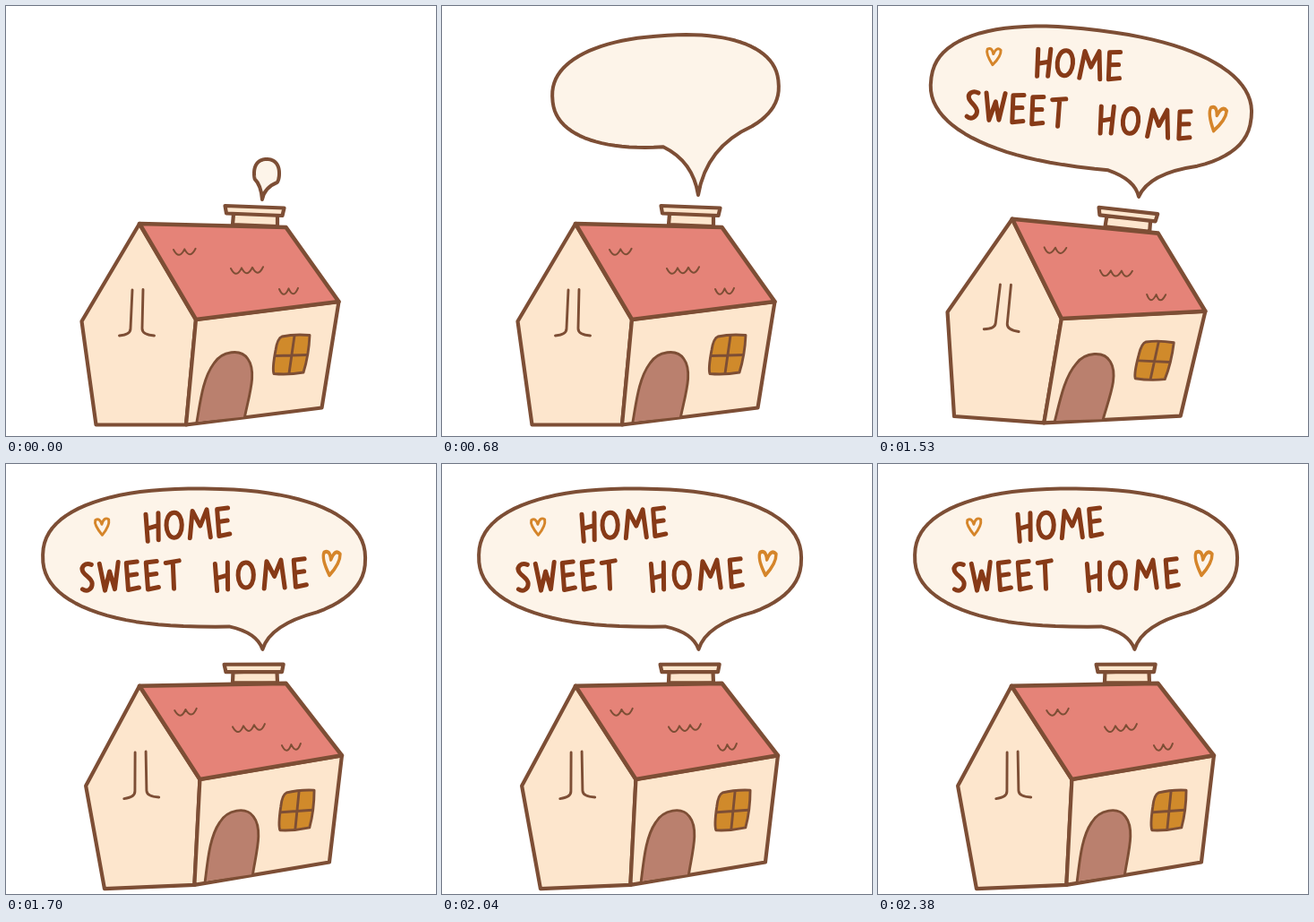
An HTML page for the animation above (2550 ms loop, 480 px wide and 480 px high).

```html
<!DOCTYPE html>
<html lang="en">
<head>
<meta charset="utf-8">
<title>Home sweet home</title>
<style>
  html, body { margin: 0; width: 100%; height: 100%; overflow: hidden; background: #fff; }
  svg { display: block; width: 100vw; height: 100vh; }
  path { fill: none; stroke: #7d4e35; stroke-width: 2.9; stroke-linecap: round; stroke-linejoin: round; }
  .wall path { fill: #fde6cd; stroke-width: 4.2; }
  .wall .roof { fill: #e58378; stroke-width: 4.6; }
  .door { fill: #ba806e; }
  .pane { fill: #d08a2b; }
  #tiles path { stroke-width: 2; }
  #bubble { fill: #fdf4e9; stroke-width: 4; }
  #letters path { stroke: #873a17; stroke-width: 5; }
  #heart { stroke: #d5852a; }
</style>
</head>
<body>
<svg viewBox="0 0 480 480" role="img" aria-label="Home sweet home">
  <defs>
    <path id="heart" d="M0 10Q-9 -2 -7 -7Q-2 -10 0 -2Q3 -11 8 -7Q9 0 0 10"/>
  </defs>
  <g id="scene">
    <g class="wall">
      <path d="M254 232H303V246L253 244Z"/>
      <path d="M244.500 223L310.500 225.500L308.500 234L246 231.500Z"/>
      <path d="M149 243L84.500 352L100.500 467.500H201L212 350Z"/>
      <path d="M212 350L201 467.500L352.500 448.500L371.500 330Z"/>
      <path class="roof" d="M149 243L312.500 247L371.500 330L212 350Z"/>
    </g>
    <g id="tiles"></g>
    <path d="M141 317L139 360Q139 367 126.500 368M153 316.500L152 360Q152 367 165.500 368"/>
    <path class="door" d="M213 464C217 441 220 415 232 399C241 385 262 382 270 394C280 408 272 432 266.500 458.500"/>
    <path class="pane" d="M308 369Q322 366 339 367.500Q338 390 332 409Q315 412 299 410.500Q297 405 301 384Q303 371 308 369Z"/>
    <path d="M322 368L316 410M301 390.500L336 389.500"/>
    <path id="bubble"/>
    <g id="text">
      <g id="letters"></g>
      <use href="#heart" transform="translate(114.500 63)"/>
      <use href="#heart" transform="translate(368 114) rotate(8) scale(1.200 1.450)"/>
    </g>
  </g>
</svg>
<script>
const STEP = 170, COUNT = 15, GROWN = 4, WORDS = 6, FULL = 8;
const $ = id => document.getElementById(id);

// A row of scallops on the roof.
function tile(x, y, count, w) {
  const arc = `q${w / 2} 12 ${w} -.6`;
  $("tiles").innerHTML += `<path d="M${x} ${y}${arc.repeat(count)}"/>`;
}
tile(187, 272, 2, 12.3);
tile(251, 293, 3, 12);
tile(305, 316, 2, 10.5);

// Pen strokes and width of each letter.
const glyphs = {
  H: ["M0 1L1 31M14 0L13 30M1 17L13 14", 14],
  O: ["M9 1C-3 1 -3 29 8 29C20 29 20 1 9 1", 17],
  M: ["M0 31L4 1L12 18L20 0L23 31", 23],
  E: ["M12 0L0 1L1 31L13 29M1 15L11 14", 13],
  S: ["M11 2C4 -1 -1 4 1 9C3 14 11 17 11 23C11 29 5 33 0 29", 11],
  W: ["M0 1L5 31L11 10L16 30L21 0", 21],
  T: ["M0 2L15 0M8 1V31", 15]
};

function word(text, x, y, gap, slope) {
  for (const c of text) {
    const [d, width] = glyphs[c];
    $("letters").innerHTML += `<path d="${d}" transform="translate(${x} ${y})"/>`;
    x += width + gap;
    y += slope;
  }
}
word("HOME", 164, 51, 8.6, -.8);
word("SWEET", 90, 103.500, 9, .4);
word("HOME", 239, 109.500, 11.300, -.2);

// A bubble is a soft oval whose outline opens between two angles into a tail.
const drop = { x: 291, y: 187, rx: 14, ry: 16, tilt: 0, tipX: 286, tipY: 216, from: 160, to: 35 };
const balloon = { x: 249.5, y: 95, rx: 126.5, ry: 62, tilt: -4, tipX: 286, tipY: 211, from: 92, to: 45 };
const speech = { x: 227, y: 103, rx: 180, ry: 77, tilt: 3, tipX: 288, tipY: 208, from: 83, to: 48 };

const rad = deg => deg * Math.PI / 180;
const soften = v => Math.sign(v) * Math.abs(v) ** .87;

function outline(b) {
  const cos = Math.cos(rad(b.tilt)), sin = Math.sin(rad(b.tilt));
  const sweep = 360 + b.to - b.from, count = 80;
  const points = Array.from({ length: count + 1 }, (_, i) => {
    const a = rad(b.from + sweep * i / count);
    const u = b.rx * soften(Math.cos(a)), v = b.ry * soften(Math.sin(a));
    return [b.x + u * cos - v * sin, b.y + u * sin + v * cos];
  });
  const bend = ([x, y]) => [b.tipX + .15 * (x - b.tipX), y + .3 * (b.tipY - y)];
  const first = points[0], last = points[count];
  return `M${b.tipX} ${b.tipY}Q${bend(first)} ${first}L${points.join(" ")}Q${bend(last)} ${b.tipX} ${b.tipY}Z`;
}

// The bubble rises steadily and widens late.
function grow(t) {
  const b = {};
  for (const k in drop) {
    const p = ["y", "ry", "tipY"].includes(k) ? t : t ** 1.7;
    b[k] = drop[k] + (balloon[k] - drop[k]) * p;
  }
  return b;
}

function draw(now) {
  const n = Math.floor(now / STEP) % COUNT;
  $("bubble").setAttribute("d", outline(n > GROWN ? speech : grow(n / GROWN)));

  const scale = .727 ** Math.max(0, FULL - n);
  $("text").setAttribute("visibility", n < WORDS ? "hidden" : "visible");
  $("text").setAttribute("transform", `translate(231.5 86) scale(${scale}) translate(-231.5 -86)`);

  const sway = n <= FULL ? "rotate(0)" : n % 2 ? "rotate(4.2 222 252)" : "rotate(-2.4 262 245)";
  $("scene").setAttribute("transform", sway);
}

const start = performance.now();
function tick() {
  draw(performance.now() - start);
  requestAnimationFrame(tick);
}
tick();
</script>
</body>
</html>
```
